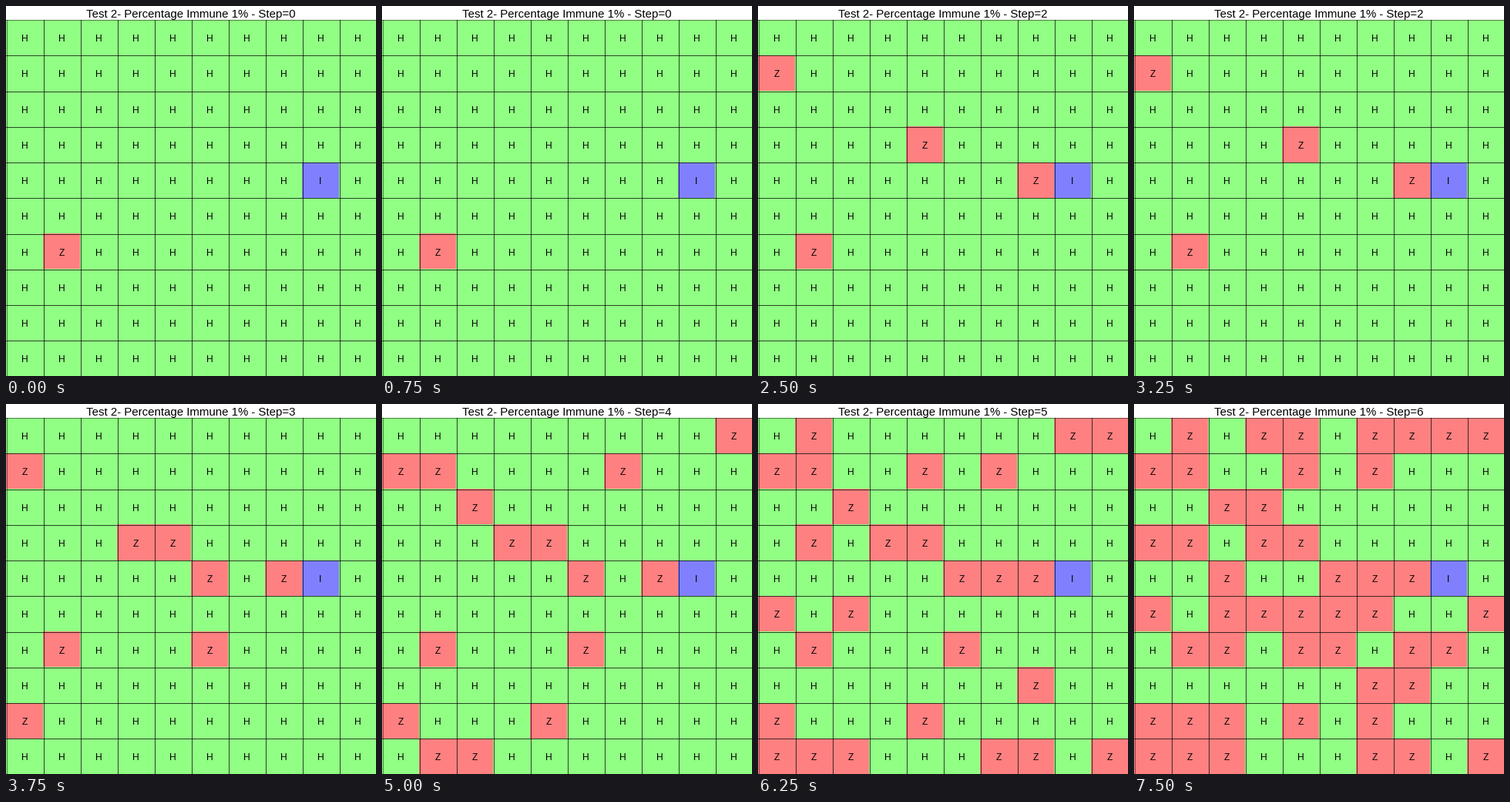
A matplotlib script that plays this animation: 480x480 px, repeating every 8 s.

```python
import matplotlib.pyplot as plt
from matplotlib.animation import FuncAnimation
from matplotlib.patches import Rectangle

SIZE, DPI, N = 480, 80, 10
PX = 72 / DPI
TOP = 17.5
CELL_W, CELL_H = SIZE / N, (SIZE - TOP) / N
COLORS = {"H": "#91ff84", "Z": "#ff8080", "I": "#8080ff"}
TICK_MS, TICKS, TICKS_PER_STEP = 250, 32, 5

# Cells (10 * row + column) that turn at each step
IMMUNE = 48
INFECTED = [
    [61],
    [10],
    [34, 47],
    [33, 45, 65, 80],
    [9, 11, 16, 22, 84, 91, 92],
    [1, 8, 14, 31, 46, 50, 52, 77, 90, 96, 97, 99],
    [3, 4, 6, 7, 23, 30, 42, 53, 54, 55, 56, 59,
     62, 64, 67, 68, 76, 81, 82, 86],
]
INFECTION_STEP = {cell: s for s, cells in enumerate(INFECTED) for cell in cells}

plt.rcParams["font.family"] = "Liberation Sans"
fig = plt.figure(figsize=(SIZE / DPI, SIZE / DPI), dpi=DPI, facecolor="white")
ax = fig.add_axes([0, 0, 1, 1])
ax.set_xlim(0, SIZE)
ax.set_ylim(SIZE, 0)
ax.axis("off")

title = ax.text(SIZE / 2, 15, "", fontsize=15 * PX, ha="center", va="baseline",
                zorder=4)


def make_cell(index):
    row, col = divmod(index, N)
    x, y = col * CELL_W, TOP + row * CELL_H
    box = Rectangle((x, y), CELL_W, CELL_H, lw=0)
    ax.add_patch(box)
    label = ax.text(x + CELL_W / 2, y + CELL_H / 2 + 5.4, "",
                    fontsize=12 * PX, ha="center", va="baseline", zorder=4)
    return box, label


cells = [make_cell(i) for i in range(N * N)]

# Neighbouring translucent borders overlap, so inner lines are darker
for i in range(N + 1):
    alpha = 0.5 if i in (0, N) else 0.72
    x = min(int(i * CELL_W), SIZE - 1) + 0.5
    y = min(int(TOP + i * CELL_H), SIZE - 1) + 0.5
    style = dict(color="black", lw=PX, alpha=alpha, zorder=3)
    ax.plot([x, x], [TOP, SIZE], **style)
    ax.plot([0, SIZE], [y, y], **style)


def state(index, step):
    if index == IMMUNE:
        return "I"
    return "Z" if INFECTION_STEP.get(index, TICKS) <= step else "H"


def draw(tick):
    step = tick // TICKS_PER_STEP
    title.set_text(f"Test 2- Percentage Immune 1% - Step={step}")
    for i, (box, label) in enumerate(cells):
        kind = state(i, step)
        box.set_facecolor(COLORS[kind])
        label.set_text(kind)
    return []


anim = FuncAnimation(fig, draw, frames=TICKS, interval=TICK_MS, repeat=True,
                     repeat_delay=0, init_func=lambda: draw(0))
plt.show()
```
